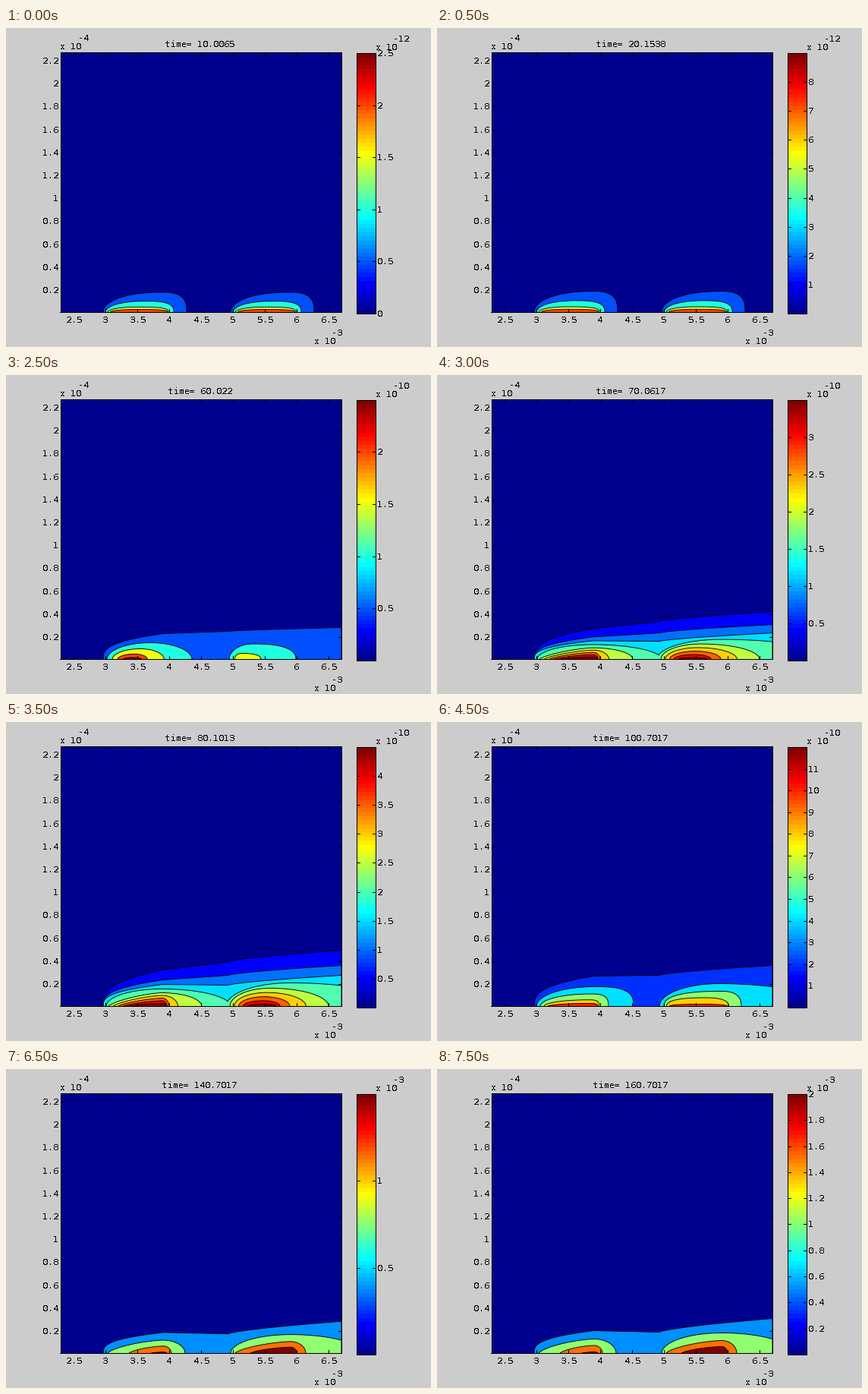
Animation, 560 px wide and 420 px high, one loop 8000 ms. Source, as a matplotlib script:

```python
import numpy as np
import matplotlib.pyplot as plt
from matplotlib.animation import ArtistAnimation
from matplotlib.patches import Polygon, Rectangle

plt.rcParams.update({
    "font.family": "DejaVu Sans Mono",
    "text.antialiased": False,
    "text.hinting": "native",
    "text.hinting_factor": 1,
})

W, H, DPI = 560, 420, 100
PX = 72 / DPI                                # one pixel in points
LEFT, TOP, RIGHT, BASE = 72, 32, 442, 374    # plot box
BAR_L, BAR_T, BAR_R, BAR_B = 462, 33, 487, 376
X = np.arange(LEFT, RIGHT + 0.1, 0.25)

fig = plt.figure(figsize=(W / DPI, H / DPI), dpi=DPI, facecolor="#cccccc")
ax = fig.add_axes([0, 0, 1, 1])
ax.set(xlim=(0, W), ylim=(H - 0.5, -0.5))
ax.axis("off")


def jet(k):
    """Colour k (1..64) of the 64-step jet map."""
    ramp = lambda a, b: float(np.clip(min(k - a, b - k) / 16, 0, 1))
    return ramp(24, 72), ramp(8, 56), ramp(-8, 40)


def label(x, y, s, ha="left"):
    return ax.text(x, y + 4, s, size=10.7 * PX, ha=ha, va="baseline", zorder=6)


def stroke(xs, ys):
    return ax.plot(xs, ys, color="k", lw=PX, antialiased=False, zorder=5,
                   solid_capstyle="butt")[0]


def box(x0, y0, x1, y1, color):
    ax.add_patch(Rectangle((x0, y0), x1 - x0, y1 - y0, fc=color, lw=0,
                           antialiased=False, zorder=1))


def outline(x0, y0, x1, y1):
    stroke([x0, x1, x1, x0, x0], [y0, y0, y1, y1, y0])


# Contours are height curves over X, given as (level, heights)

def dome(a, peak, b, h, l, r):
    """Bump from foot a to foot b; l and r set how square each side is."""
    t = np.where(X < peak, (peak - X) / (peak - a), (X - peak) / (b - peak))
    n = np.where(X < peak, l, r)
    return h * (1 - np.minimum(t, 1) ** n) ** (1 / n)


def plume(first, last, outer, inner=None, kx=2.0, kh=1.6, l=2.0, r=2.0):
    """Nested domes easing from the outer to the inner (a, peak, b, h)."""
    inner = inner or outer
    out = []
    for level in range(first, last + 1):
        u = (level - first) / max(last - first, 1)
        ease = [1 - (1 - u) ** k for k in (1, kx, kx, kh)]
        shape = [p + (q - p) * e for p, q, e in zip(outer, inner, ease)]
        out.append((level, dome(*shape, l, r)))
    return out


def layer(level, h1, h2, h3):
    """Boundary layer: steep rise, shelf, then a second slow rise."""
    s1, s2, s3 = (np.clip((X - a) / (b - a), 0, 1)
                  for a, b in ((128, 207), (207, 293), (293, 442)))
    return [(level, h1 * s1 ** 0.33 + (h2 - h1) * s2 + (h3 - h2) * s3 ** 0.7)]


def low():
    args = dict(kx=2.8, kh=1.8, l=2.1, r=3)
    return (plume(1, 4, (128, 203, 238, 26.5), (137, 172, 213, 4), **args)
            + plume(1, 4, (296, 371, 406, 26.5), (305, 340, 381, 4), **args))


def spot():
    return (layer(1, 40, 38, 35)
            + plume(2, 11, (128, 185, 241, 26.5), (138, 141, 144, 3), 2.8, 1.8)
            + plume(2, 2, (296, 335, 389, 16), l=2.5, r=4)
            + plume(3, 3, (302, 308, 383, 7), r=1.1))


def tail():
    return (layer(1, 34, 37, 42)
            + plume(2, 5, (133, 190, 245, 22), (154, 167, 179, 2.5), 2, 1.3)
            + plume(2, 3, (294, 325, 382, 20.5), (301, 310, 336, 8), r=2.5))


def wide():
    return (layer(1, 48, 59, 74) + layer(2, 35, 41, 54) + layer(3, 29, 28, 41)
            + plume(4, 4, (132, 205, 296, 23))
            + plume(4, 4, (290, 375, 520, 31))
            + plume(5, 9, (135, 205, 258, 18), (160, 206, 212, 4), 4, 1, 1.4)
            + plume(5, 9, (295, 348, 425, 24), (318, 338, 357, 3), 2, 1.1))


def shelf():
    return (layer(1, 40, 41, 54)
            + plume(2, 5, (131, 207, 259, 26), (146, 200, 212, 4), 3, 1.4, r=3)
            + plume(2, 2, (293, 372, 510, 30))
            + plume(3, 5, (299, 375, 401, 20), (306, 350, 382, 3), 3, 1, 2.5, 2.5))


def nest():
    return (plume(1, 11, (129, 185, 245, 32), (152, 162, 176, 3),
                  1.4, 2.5, 1.7, 2.2)
            + plume(1, 5, (295, 335, 389, 26.5), (309, 317, 334, 4), 1.1))


def ridge():
    return (layer(1, 30, 28, 46)
            + plume(2, 4, (134, 207, 236, 19), (190, 207, 212, 2), 2, 1, 1.5)
            + plume(2, 2, (296, 375, 469, 27))
            + plume(3, 4, (302, 375, 395, 17), (322, 375, 383, 9), l=1.5))


# time, exponent, bar top, first tick, tick step, level count, shapes, growth
SCENES = [
    (10.0065, -12, 2.5, 0, 0.5, 5, low, 1),
    (20.1538, -12, 8.999, 1, 1, 5, low, 1.05),
    (30.2246, -11, 2.5, 0.5, 0.5, 11, spot, 0.95),
    (40.3123, -11, 11, 1, 1, 11, spot, 1),
    (50.1672, -11, 15.999, 2, 2, 5, tail, 0.97),
    (60.022, -10, 2.499, 0.5, 0.5, 5, tail, 1),
    (70.0617, -10, 3.499, 0.5, 0.5, 9, wide, 0.85),
    (80.1013, -10, 4.499, 0.5, 0.5, 9, wide, 1),
    (90.4015, -10, 6.999, 1, 1, 6, shelf, 1.1),
    (100.7017, -10, 11.999, 1, 1, 6, shelf, 1),
    (110.7017, -9, 5.5, 0.5, 0.5, 11, nest, 1.03),
    (120.7017, -8, 5.5, 0.5, 0.5, 11, nest, 1),
    (130.7017, -5, 2.5, 0.5, 0.5, 6, shelf, 0.9),
    (140.7017, -3, 1.499, 0.5, 0.5, 4, ridge, 0.92),
    (150.7017, -3, 1.499, 0.5, 0.5, 4, ridge, 0.96),
    (160.7017, -3, 2, 0.2, 0.2, 4, ridge, 1),
]


def draw_static():
    box(LEFT, TOP, RIGHT, BASE, jet(1))
    outline(LEFT, TOP, RIGHT, BASE)
    for v in np.arange(2.5, 6.6, 0.5):
        x = round(LEFT + (v - 2.3) * 84.1)
        stroke([x, x], [BASE, BASE - 4])
        stroke([x, x], [TOP, TOP + 4])
        label(x, 384, f"{v:g}", "center")
    for v in np.arange(0.2, 2.3, 0.2):
        y = round(375.2 - 151 * v)
        stroke([LEFT, LEFT + 4], [y, y])
        stroke([RIGHT - 4, RIGHT], [y, y])
        label(69, y, f"{v:.2g}", "right")
    label(71, 24, "x 10")
    label(95, 13, "-4")
    label(406, 412, "x 10")
    label(429, 401, "-3")

    edges = np.round(np.linspace(BAR_B, BAR_T, 65)) - 0.5
    for k in range(64):
        box(BAR_L, edges[k], BAR_R, edges[k + 1], jet(k + 1))
    outline(BAR_L, BAR_T, BAR_R, BAR_B)
    label(487, 25, "x 10")


def draw_scene(time, exponent, top, start, step, count, shapes, growth):
    art = [label(255.5, 21, f"time= {time:.7g}", "center"),
           label(510, 14, str(exponent))]

    heights = {}
    for level, h in shapes():
        heights[level] = np.maximum(heights.get(level, 0), h * growth)
    for level, h in heights.items():
        xy = np.column_stack([X, BASE - h])
        xy = np.vstack([[LEFT, BASE], xy, [RIGHT, BASE]])
        art.append(ax.add_patch(Polygon(
            xy, fc=jet(min(64, level * 64 // count + 1)), ec="k",
            lw=0.9 * PX, joinstyle="round", zorder=2 + level / 20)))

    for v in np.arange(start, top + 1e-6, step):
        y = round(BAR_B - (BAR_B - BAR_T) * v / top)
        art += [stroke([BAR_L, BAR_L + 4], [y, y]),
                stroke([BAR_R - 4, BAR_R], [y, y]),
                label(489, y, f"{v:.3g}")]
    return art


draw_static()
frames = [draw_scene(*scene) for scene in SCENES]
anim = ArtistAnimation(fig, frames, interval=500, repeat=True, repeat_delay=0)
plt.show()
```
